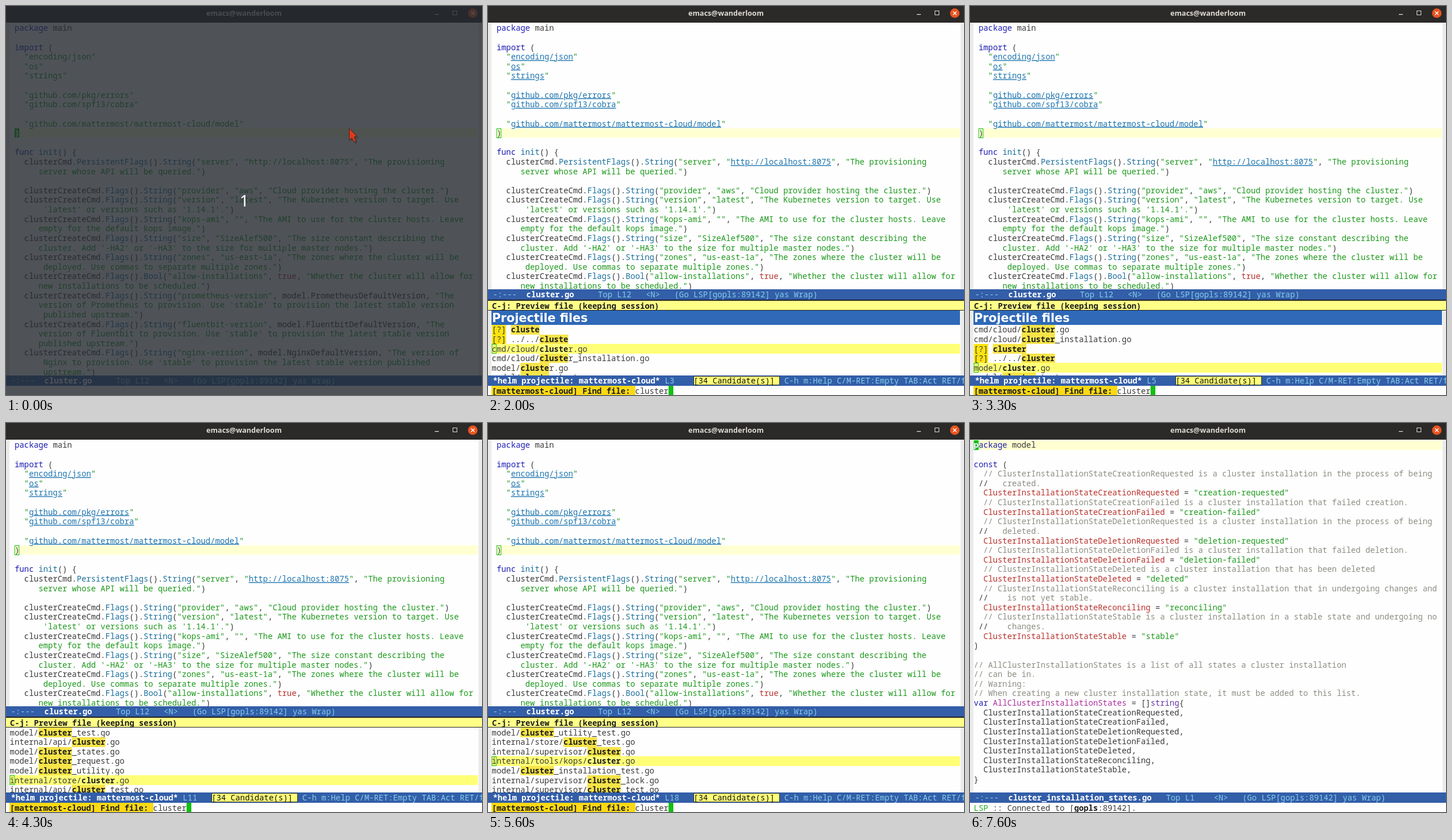
These frames come from a looping animation (827x677 px, 8000 ms). An HTML page:

```html
<!DOCTYPE html>
<html lang="en">
<head>
<meta charset="utf-8">
<title>Editor file finder</title>
<style>
  html, body { margin: 0; width: 100%; height: 100%; overflow: hidden; background: #fff; }
  svg { display: block; width: 827px; height: 677px; }
  text { font: 13.83px "Noto Sans Mono", "DejaVu Sans Mono", monospace; white-space: pre; fill: #3a3a3a; }
  .bold { font-weight: 700; fill: #1c1c1c; }
  .title { font: 700 12.6px "Noto Sans", "Open Sans", sans-serif; fill: #dfdbd2; text-anchor: middle; }
  .source { font: 700 20.6px "DejaVu Sans", sans-serif; fill: #fff; }
  .count { font: 28px "Noto Sans", sans-serif; fill: #fff; text-anchor: middle; }
  .keyword { fill: #1c1cb4; }
  .string { fill: #1c981c; }
  .method { fill: #1b6f9c; }
  .constant { fill: #b8322c; }
  .variable { fill: #ae2fa0; }
  .type { fill: #6434a3; }
  .comment { fill: #8d8d84; }
  .link { fill: #1c74ae; text-decoration: underline; }
  .mode { fill: #85ceeb; }
  .white { fill: #fff; font-weight: 700; }
  .black { fill: #111; }
  .lsp { fill: #20b020; }
</style>
</head>
<body>
<svg id="stage" viewBox="0 0 827 677" xmlns="http://www.w3.org/2000/svg">
  <defs>
    <clipPath id="full"><rect y="29" width="827" height="614"/></clipPath>
    <clipPath id="split"><rect y="29" width="827" height="464"/></clipPath>
    <clipPath id="hint"><rect y="513" width="827" height="16"/></clipPath>
    <clipPath id="list"><rect y="530" width="827" height="113"/></clipPath>
  </defs>
  <g id="scene"></g>
</svg>
<script>
const LOOP = 8000, CELL = 8.3, ROW = 16.62, BASE = 13.3;
const BLUE = '#335ea8', GREEN = '#12c012', YELLOW = '#ffff77', GOLD = '#fcd914';

const clusterCode = `package main

import (
  "encoding/json"
  "os"
  "strings"

  "github.com/pkg/errors"
  "github.com/spf13/cobra"

  "github.com/mattermost/mattermost-cloud/model"
)

func init() {
  clusterCmd.PersistentFlags().String("server", "http://localhost:8075", "The provisioning
     server whose API will be queried.")

  clusterCreateCmd.Flags().String("provider", "aws", "Cloud provider hosting the cluster.")
  clusterCreateCmd.Flags().String("version", "latest", "The Kubernetes version to target. Use
      'latest' or versions such as '1.14.1'.")
  clusterCreateCmd.Flags().String("kops-ami", "", "The AMI to use for the cluster hosts. Leave
     empty for the default kops image.")
  clusterCreateCmd.Flags().String("size", "SizeAlef500", "The size constant describing the
     cluster. Add '-HA2' or '-HA3' to the size for multiple master nodes.")
  clusterCreateCmd.Flags().String("zones", "us-east-1a", "The zones where the cluster will be
      deployed. Use commas to separate multiple zones.")
  clusterCreateCmd.Flags().Bool("allow-installations", true, "Whether the cluster will allow for
     new installations to be scheduled.")
  clusterCreateCmd.Flags().String("prometheus-version", model.PrometheusDefaultVersion, "The
     version of Prometheus to provision. Use 'stable' to provision the latest stable version
      published upstream.")
  clusterCreateCmd.Flags().String("fluentbit-version", model.FluentbitDefaultVersion, "The
     version of Fluentbit to provision. Use 'stable' to provision the latest stable version
     published upstream.")
  clusterCreateCmd.Flags().String("nginx-version", model.NginxDefaultVersion, "The version of
      Nginx to provision. Use 'stable' to provision the latest stable version published
      upstream.")`.split('\n');

const statesCode = `package model

const (
  // ClusterInstallationStateCreationRequested is a cluster installation in the process of being
 //   created.
  ClusterInstallationStateCreationRequested = "creation-requested"
  // ClusterInstallationStateCreationFailed is a cluster installation that failed creation.
  ClusterInstallationStateCreationFailed = "creation-failed"
  // ClusterInstallationStateDeletionRequested is a cluster installation in the process of being
 //   deleted.
  ClusterInstallationStateDeletionRequested = "deletion-requested"
  // ClusterInstallationStateDeletionFailed is a cluster installation that failed deletion.
  ClusterInstallationStateDeletionFailed = "deletion-failed"
  // ClusterInstallationStateDeleted is a cluster installation that has been deleted
  ClusterInstallationStateDeleted = "deleted"
  // ClusterInstallationStateReconciling is a cluster installation that in undergoing changes and
 //    is not yet stable.
  ClusterInstallationStateReconciling = "reconciling"
  // ClusterInstallationStateStable is a cluster installation in a stable state and undergoing no
 //    changes.
  ClusterInstallationStateStable = "stable"
)

// AllClusterInstallationStates is a list of all states a cluster installation
// can be in.
// Warning:
// When creating a new cluster installation state, it must be added to this list.
var AllClusterInstallationStates = []string{
  ClusterInstallationStateCreationRequested,
  ClusterInstallationStateCreationFailed,
  ClusterInstallationStateDeletionRequested,
  ClusterInstallationStateDeletionFailed,
  ClusterInstallationStateDeleted,
  ClusterInstallationStateReconciling,
  ClusterInstallationStateStable,
}`.split('\n');

const projectFiles = ['.circleci/config.yml', '.editorconfig', '.gitignore', 'LICENSE', 'Makefile', 'README.md'];
const matches = `cmd/cloud/cluster.go
cmd/cloud/cluster_installation.go
[?] cluster
[?] ../../cluster
model/cluster.go
model/cluster_test.go
internal/api/cluster.go
model/cluster_states.go
model/cluster_request.go
model/cluster_utility.go
internal/store/cluster.go
internal/api/cluster_test.go
model/cluster_states_test.go
model/cluster_request_test.go
model/cluster_utility_test.go
internal/store/cluster_test.go
internal/supervisor/cluster.go
internal/tools/kops/cluster.go
model/cluster_installation_test.go
internal/supervisor/cluster_lock.go
internal/supervisor/cluster_test.go
model/cluster_installation.go
model/cluster_installation_states.go
model/cluster_installation_request.go`.split('\n');

// [time, selected line]
const selections = [[2200, 1], [2800, 2], [3000, 3], [3100, 4], [3300, 5], [3500, 6], [3700, 7],
  [3800, 8], [4200, 9], [4300, 11], [4700, 13], [4900, 14], [5100, 15], [5400, 16], [5600, 18],
  [5700, 19], [5900, 20], [6100, 21], [6300, 22], [6500, 23]];

const esc = s => s.replace(/&/g, '&amp;').replace(/</g, '&lt;');
const rect = (x, y, w, h, fill, extra = '') =>
  `<rect x="${x}" y="${y}" width="${w}" height="${h}" fill="${fill}" ${extra}/>`;
// A row background snapped to whole pixels.
const band = (x, y, w, fill) => rect(x, Math.round(y), w, Math.round(y + ROW) - Math.round(y), fill);
const text = (x, y, s, cls = '') => `<text x="${x.toFixed(2)}" y="${y.toFixed(2)}" class="${cls}">${esc(s)}</text>`;
const clip = (id, body) => `<g clip-path="url(#${id})">${body}</g>`;
const hollow = (x, y) => rect(x + .5, Math.round(y) + .5, CELL - 1, 16, 'none', `stroke="${GREEN}"`);

// Lays out [string, class] pairs on the character grid.
function runs(x, y, list) {
  let col = 0;
  return list.map(([s, cls]) => {
    const out = s.trim() ? text(x + col * CELL, y, s, cls) : '';
    col += s.length;
    return out;
  }).join('');
}

const tokens = new RegExp([
  '(?<string>"[^"]*"?)',
  '(?<plain>(?<=^ )//)',
  '(?<comment>(?<=^ //).*|//.*)',
  '(?<keyword>\\b(?:package|import|func|const|var)\\b)',
  '(?<method>\\b(?:PersistentFlags|Flags|String|Bool|init)(?=\\())',
  '(?<constant>\\btrue\\b|\\b\\w+(?= = "))',
  '(?<variable>(?<=var )\\w+)',
  '(?<type>\\bstring\\b)',
].join('|'), 'g');

function code(lines, x, links) {
  let open = false;
  return lines.map((line, row) => {
    const src = (open ? '"' : '') + line, list = [];
    let at = 0, skip = open;
    const push = (s, cls) => { list.push([skip ? s.slice(1) : s, cls]); skip = false; };
    open = false;
    for (const m of src.matchAll(tokens)) {
      const s = m[0], cls = Object.keys(m.groups).find(k => m.groups[k] !== undefined);
      if (!s) continue;
      if (m.index > at) push(src.slice(at, m.index), '');
      at = m.index + s.length;
      if (cls === 'string') {
        open = s.length < 2 || !s.endsWith('"');
        if (links && (row < 12 || s.startsWith('"http'))) {
          push('"', cls);
          push(s.slice(1, -1), 'link');
          push('"', cls);
          continue;
        }
      }
      push(s, cls);
    }
    if (at < src.length) push(src.slice(at), '');
    return runs(x, 30 + row * ROW + BASE, list);
  }).join('');
}

const fullCode = code(clusterCode, 15, false);
const linkedCode = code(clusterCode.slice(0, 29), 15, true);
const statesText = code(statesCode, 6.6, false);

const frame = rect(0, 0, 827, 677, '#fefefe') +
  rect(0, 29, 6, 614, '#ebebeb') + rect(821, 29, 6, 614, '#ebebeb') +
  rect(0, 0, 827, 29, '#2b2a29') +
  text(413.5, 17.3, 'emacs@wanderloom', 'title') +
  rect(745, 14, 7, 1.3, '#dfdbd2') +
  rect(776.5, 8.5, 7, 7, 'none', 'stroke="#dfdbd2"') +
  '<circle cx="811" cy="12.5" r="8.3" fill="#e95420"/>' +
  '<path d="M808 9.5l6 6m0-6l-6 6" stroke="#fff" stroke-width="1.3"/>';

const pointer = '<path d="M598 215v21l5-4 4 8 4-2-3-8h6z" fill="#000" opacity=".18"/>' +
  '<path d="M596.500 213v20.500l4.500-4 3.500 7 3.500-1.800-3.200-6.500 4.200-2.200z" fill="#dc3a20" stroke="#5a1a12"/>';

function modeLine(top, name, gap, rest) {
  return rect(0, top, 827, 18, BLUE) +
    runs(8.5, top + 14.4, [['-:---  ', 'mode'], [name, 'white'],
      [gap + rest + '   (Go LSP[gopls:89142] yas Wrap)', 'mode']]);
}

function editor(split) {
  const y = 30 + 11 * ROW;
  const line = band(15, y, 805, '#ffffd2');
  const cursor = split ? hollow(14.8, y) : band(14.8, y, CELL, GREEN) + text(15, y + BASE, ')', 'white');
  return clip(split ? 'split' : 'full', line + (split ? linkedCode : fullCode) + cursor) +
    modeLine(split ? 493 : 643, 'cluster.go', '     ', 'Top L12   <N>');
}

function candidate(s, pattern, y, selected) {
  const x = 6.6, at = pattern ? s.indexOf(pattern) : -1;
  let out = selected ? band(6, y, 814, YELLOW) : '';
  if (s.startsWith('[?]')) out += band(x, y, 3 * CELL, '#ffe310');
  if (at < 0) out += text(x, y + BASE, s);
  else {
    if (!selected) out += band(x + at * CELL, y, pattern.length * CELL, '#f6e448');
    out += runs(x, y + BASE, [[s.slice(0, at), ''], [pattern, 'bold'], [s.slice(at + pattern.length), '']]);
  }
  return out + (selected ? hollow(6.5, y) : '');
}

function helm({ items, pattern, line, total, typed, cursorOn }) {
  const header = line < 6, top = header ? 1 : 3 * Math.floor(line / 3) - 3;
  const y0 = header ? 555 : 530.3;
  const rows = items.slice(top - 1, top + 6)
    .map((s, i) => candidate(s, pattern, y0 + i * ROW, top + i === line)).join('');
  const title = header ? rect(6, 530, 814, 25, '#2f69b8') + text(7, 549.5, 'Projectile files', 'source') : '';
  const x = 8.5, y = 657.4, inputX = 6.6 + 30 * CELL, inputY = 674.8;
  return rect(0, 511, 827, 19, '#222') + rect(0, 513, 827, 16, '#ffff88') +
    clip('hint', text(7, 527.3, 'C-j: Preview file (keeping session)', 'bold')) +
    clip('list', rows + title) +
    rect(0, 643, 827, 18, BLUE) +
    runs(x, y, [['*helm projectile: mattermost-cloud*', 'white'], [' L' + line, 'mode']]) +
    rect(357.5, 644.5, 149, 15, YELLOW, 'stroke="#333"') +
    text(x + 42 * CELL, y, `[${total} Candidate(s)]`, 'black') +
    text(x + 61 * CELL, y, 'C-h m:Help C/M-RET:Empty TAB:Act RET/f1', 'mode') +
    rect(6, 661, 250, 16, GOLD) + text(6.6, inputY, '[mattermost-cloud] Find file:', 'bold') +
    text(inputX, inputY, typed) +
    (cursorOn ? rect(inputX + typed.length * CELL, 661, CELL, 16, GREEN) : '');
}

function statesView() {
  return band(6, 30, 814, '#ffffd2') + band(6.6, 30, CELL, GREEN) + statesText +
    text(6.6, 30 + BASE, 'p', 'white') +
    modeLine(643, 'cluster_installation_states.go', '   ', 'Top L1    <N>') +
    runs(6.6, 674.8, [['LSP', 'lsp'], [' :: Connected to [', ''], ['gopls', 'bold'], [':89142].', '']]);
}

function helmState(t) {
  const count = t < 1400 ? 0 : Math.min(7, Math.floor((t - 1400) / 100) + 1);
  const typed = 'cluster'.slice(0, count);
  const state = { typed, cursorOn: !(t >= 2500 && t < 3000) && t < 7000 };
  if (t < 1600) return { ...state, items: projectFiles, pattern: '', line: 1, total: 100 };
  if (t < 2200) {
    // The list lags one key behind the input.
    const pattern = typed.slice(0, -1);
    const items = ['[?] ' + pattern, '[?] ../../' + pattern, ...matches.slice(0, 2), ...matches.slice(4)];
    return { ...state, items, pattern, line: 3, total: 34 };
  }
  const line = selections.filter(([at]) => at <= t).pop()[1];
  return { ...state, items: matches, pattern: 'cluster', line, total: 34 };
}

function scene(t) {
  if (t >= 7600) return frame + statesView();
  if (t >= 900) return frame + editor(true) + helm(helmState(t)) + (t < 1400 ? pointer : '');
  const dim = t < 100 ? 1 : t < 200 ? .35 : 0;
  const overlay = rect(0, 0, 827, 677, 'rgb(36,40,47)', 'fill-opacity=".8"') + text(414, 348.5, '1', 'count');
  return frame + editor(false) + (dim ? `<g opacity="${dim}">${overlay}</g>` : '') + pointer;
}

const root = document.getElementById('scene');
let shown = -1;
function tick() {
  const step = Math.floor(performance.now() % LOOP / 100) * 100;
  if (step !== shown) {
    shown = step;
    root.innerHTML = scene(step);
  }
  requestAnimationFrame(tick);
}
tick();
</script>
</body>
</html>
```
